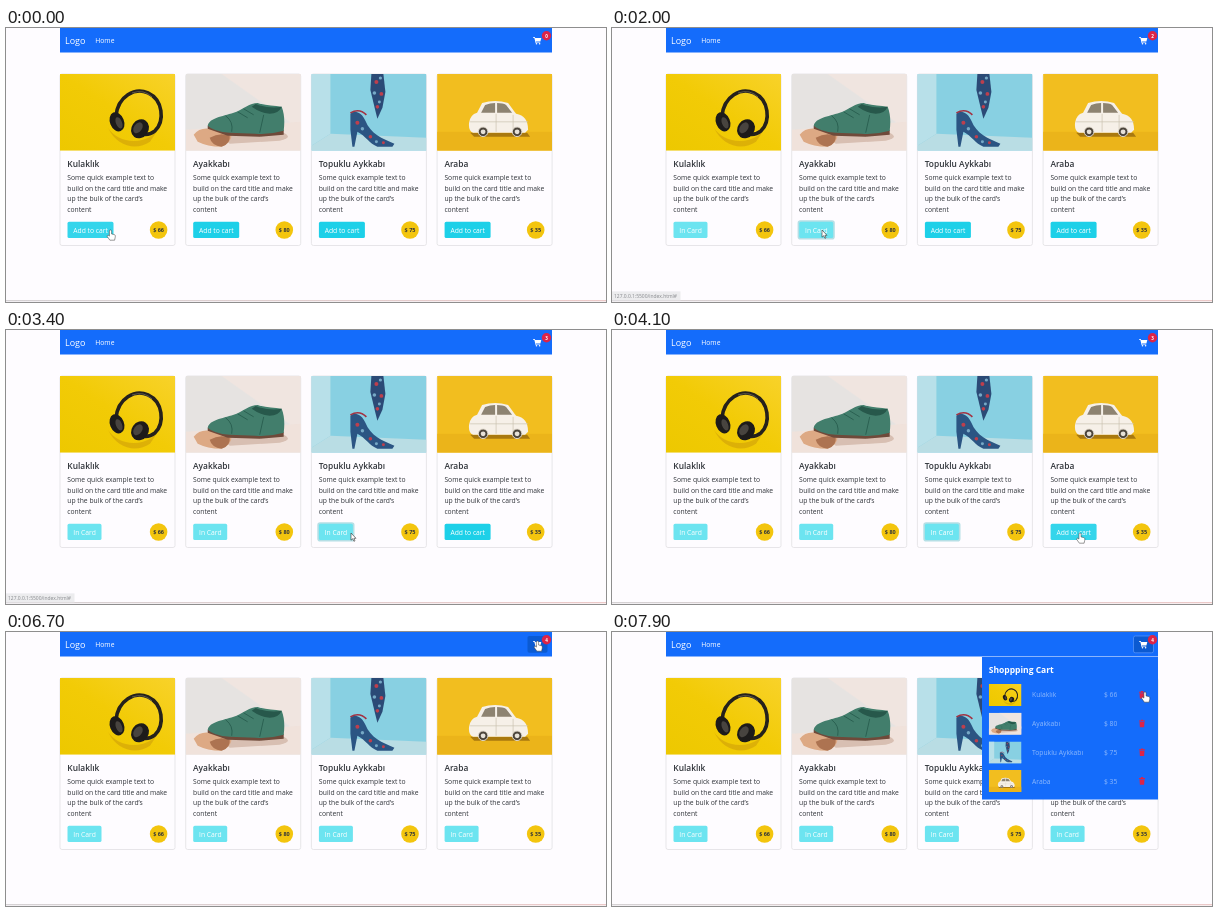
Write an HTML page that moves like this. It is 600 px wide and 274 px high and loops after 8000 ms.

```html
<!DOCTYPE html>
<html lang="en">
<head>
<meta charset="utf-8">
<style>
html, body { margin: 0; width: 600px; height: 274px; overflow: hidden; background: #fefcff; }
svg { display: block; }
text { font: 6.75px "Open Sans", sans-serif; fill: #30343a; white-space: pre; }
.light { fill: #fff; }
.brand { font-size: 9px; fill: #fff; }
.title { font-size: 8.4px; font-weight: 600; }
.heading { font-size: 8.5px; font-weight: 700; fill: #fff; }
.price { font-size: 5.5px; font-weight: 700; text-anchor: middle; }
.count { font-size: 4.6px; font-weight: 700; fill: #fff; text-anchor: middle; }
.item { fill: #8db8fc; }
.status { font-size: 4.95px; fill: #85878b; }
</style>
</head>
<body>
<svg width="600" height="274" viewBox="0 0 600 274">
  <defs>
    <linearGradient id="yellow" x1="0" y1="1" x2="1" y2="0">
      <stop stop-color="#edc800"/><stop offset=".5" stop-color="#f2cb06"/><stop offset="1" stop-color="#f8d22a"/>
    </linearGradient>
    <linearGradient id="edge"><stop stop-color="#d5d2d4"/><stop offset="1" stop-color="#ecc9c8"/></linearGradient>
    <symbol id="photo0" viewBox="0 0 115 77" preserveAspectRatio="none">
      <path fill="url(#yellow)" d="M0 0H115V77H0Z"/>
      <path fill="#c9980a" opacity=".5" d="M48 54C56 67 76 72 92 62L102 50 90 68C76 78 56 72 48 54Z"/>
      <path fill="none" stroke="#25211c" stroke-width="3.6" d="M56 42C58 22 75 13 88 19C103 26 105 47 95 57Q89 62 81 60"/>
      <path fill="none" stroke="#77715f" stroke-width=".7" d="M72 19Q84 15 92 23"/>
      <g fill="#1d1b1a">
        <ellipse cx="57" cy="48" rx="7" ry="10" transform="rotate(-22 57 48)"/>
        <ellipse cx="80" cy="55" rx="8.5" ry="10" transform="rotate(35 80 55)"/>
      </g>
      <g fill="#48443f">
        <ellipse cx="59" cy="49" rx="3" ry="6" transform="rotate(-22 59 49)"/>
        <ellipse cx="78" cy="54" rx="4" ry="6" transform="rotate(35 78 54)"/>
      </g>
    </symbol>
    <symbol id="photo1" viewBox="0 0 115 77" preserveAspectRatio="none">
      <path fill="#e6e3e1" d="M0 0H115V77H0Z"/>
      <path fill="#f0e5e0" d="M36 0H115V56Z"/>
      <path fill="#f0e2db" d="M0 56L115 48V77H0Z"/>
      <path fill="#d8bfb2" d="M36 62L98 59Q108 64 94 67L44 70Z"/>
      <path fill="#dda984" d="M8 61Q14 53 25 55L46 60Q46 70 35 73Q22 73 12 68Z"/>
      <path fill="#ad7351" d="M24 64Q34 58 44 62Q45 70 36 73Q26 72 24 64Z"/>
      <path fill="#6f4a3a" d="M22 52L44 58 74 59 98 56V61L74 63 42 62 22 55Z"/>
      <path fill="#427e6c" d="M22 52C24 44 36 43 48 39C58 35 64 29 72 29C80 32 88 31 96 33C99 41 99 49 98 57Q84 61 70 60L44 59Q28 58 22 52Z"/>
      <path fill="#27584b" d="M70 30Q82 35 96 33Q93 40 84 40Q74 39 66 33Z"/>
      <path fill="none" stroke="#2b6152" d="M52 38L62 44M58 35L68 41M40 42Q48 48 46 58M78 41L74 59"/>
    </symbol>
    <symbol id="photo2" viewBox="0 0 115 77" preserveAspectRatio="none">
      <path fill="#88d0e2" d="M0 0H115V77H0Z"/>
      <path fill="#b8e0e9" d="M0 0H19V60L0 72Z"/>
      <path fill="#b9dde4" d="M19 60L115 64V77H0V72Z"/>
      <path fill="#2b4a76" d="M60 0H72L74 18 71 34 66 45 63 33 59 16Z"/>
      <path fill="#2b5583" d="M39 40C43 35 51 39 54 47C59 60 71 65 83 70L81 73H66C58 70 54 62 46 58L43 73H41L39 56Z"/>
      <path fill="none" stroke="#a33343" stroke-width="1.6" d="M39 39Q48 34 55 41"/>
      <g fill="#bd3f4d"><circle cx="65" cy="8" r="2"/><circle cx="70" cy="20" r="1.9"/><circle cx="66" cy="33" r="1.8"/><circle cx="46" cy="49" r="2"/><circle cx="59" cy="63" r="1.8"/><circle cx="72" cy="69" r="1.5"/></g>
      <g fill="#76a9c6"><circle cx="69" cy="4" r="1.6"/><circle cx="63" cy="19" r="1.8"/><circle cx="68" cy="28" r="1.5"/><circle cx="51" cy="55" r="1.7"/><circle cx="65" cy="68" r="1.5"/></g>
    </symbol>
    <symbol id="photo3" viewBox="0 0 115 77" preserveAspectRatio="none">
      <path fill="#f2be1f" d="M0 0H115V77H0Z"/>
      <path fill="#ebb41a" d="M0 58H115V77H0Z"/>
      <path fill="#a9790f" d="M33 59H90L93 63H37Z"/>
      <path fill="#f6f0e8" d="M32 49Q33 41 40 39L45 29Q58 25 71 29L79 40Q91 42 91 56L88 59H36Q31 57 32 49Z"/>
      <path fill="#8d8371" d="M44 39L48 31Q53 29 58 29V39ZM60 39V29Q66 29 69 31L75 39Z"/>
      <path fill="none" stroke="#c9c0af" stroke-width=".7" d="M33 48H91M59 40V58M76 41V55"/>
      <g fill="#4b443b" stroke="#e2dbcf"><circle cx="46" cy="58" r="4.8"/><circle cx="80" cy="58" r="4.8"/></g>
      <g fill="#e6e1d8"><circle cx="46" cy="58" r="2.4"/><circle cx="80" cy="58" r="2.4"/></g>
    </symbol>
    <path id="trash" fill="#dc2448" d="M-3-3.2H-1.2L-.8-4H.8L1.2-3.2H3V-2.2H-3ZM-2.5-1.7H2.5L2.1 3.6H-2.1Z"/>
    <path id="arrow" fill="#fff" stroke="#333" stroke-width=".6" d="M0 0V7.2L1.7 5.7 2.9 8.3 4 7.8 2.9 5.3H5Z"/>
    <path id="hand" fill="#fff" stroke="#333" stroke-width=".5" d="M-1.1 1C-1.1-.4 1.1-.4 1.1 1V4L3.6 4.5C4.8 4.8 5 5.8 4.7 7.4L4.1 10.2H-.6L-3.2 6.6C-3.7 5.5-2.6 4.8-1.8 5.5L-1.1 6.1Z"/>
  </defs>
  <g id="page"></g>
  <g id="live"></g>
</svg>
<script>
const BLUE = '#146cfb', LOOP = 8000;
const products = [['Kulaklık', 66], ['Ayakkabı', 80], ['Topuklu Aykkabı', 75], ['Araba', 35]];
const blurb = ['Some quick example text to', 'build on the card title and make', 'up the bulk of the card’s', 'content'];
const clicks = [400, 2000, 3200, 4600];
const statusTimes = [[300, 1300], [1800, 2500], [3000, 3600], [4200, 5500]];
const cartHover = 6300, cartClick = 6700, panelOpen = 6800;
// time, x, y of the pointer tip
const path = [
  [0, 104.5, 202], [500, 104.5, 202], [1000, 141, 202], [1750, 210, 202], [2200, 210, 202],
  [2800, 362, 206], [3050, 345, 203], [3400, 345, 203], [4100, 468, 203], [4750, 468, 203],
  [5100, 487.5, 174.5], [5450, 493, 160], [6300, 531.5, 9], [7100, 531.5, 9], [7800, 533, 60], [LOOP, 533, 60]
];

const cardX = i => 54 + i * 125.7;
const rect = (x, y, w, h, fill, more = '') =>
  `<rect x="${x}" y="${y}" width="${w}" height="${h}" fill="${fill}" ${more}/>`;
const label = (x, y, cls, str) => `<text x="${x}" y="${y}" class="${cls}">${str}</text>`;
const circle = (x, y, r, fill) => `<circle cx="${x}" cy="${y}" r="${r}" fill="${fill}"/>`;
const photo = (i, x, y, w, h) => `<use href="#photo${i}" x="${x}" y="${y}" width="${w}" height="${h}"/>`;
const place = (id, x, y) => `<use href="#${id}" x="${x}" y="${y}"/>`;

function card([name, price], i) {
  const x = cardX(i);
  return rect(x, 46, 115, 171.5, '#fefcff', 'rx="2" stroke="#dedde0" stroke-width=".7"') +
    photo(i, x, 46, 115, 76.7) +
    label(x + 7.3, 138.7, 'title', name) +
    blurb.map((line, n) => label(x + 7.3, 152.3 + n * 10.5, '', line)).join('') +
    circle(x + 98.6, 202, 8.8, '#f3c50e') + label(x + 98.6, 204, 'price', '$ ' + price);
}

function button(i, t, pointer) {
  const x = cardX(i) + 7.5, added = t >= clicks[i], width = added ? 34 : 46;
  const end = i < 3 ? clicks[i + 1] : cartClick;
  const ring = added && t < end ? rect(x - 1.6, 192.2, width + 3.2, 19.4, '#b5dfe5', 'rx="2.8"') : '';
  const fill = added ? '#6ce4f0' : overButton(i, pointer) ? '#34d5eb' : '#1dd0e8';
  return ring + rect(x, 193.8, width, 16.2, fill, 'rx="1.6"') +
    label(x + 5.8, 204.6, 'light', added ? 'In Card' : 'Add to cart');
}

function overButton(i, [x, y]) {
  const left = cardX(i) + 7.5;
  return x > left && x < left + 46 && y > 193 && y < 210;
}

function cart(t, count) {
  const shade = Math.min(1, Math.max(0, (t - cartHover) / 150));
  const border = t >= panelOpen ? 'stroke="#5291f8" stroke-width=".8"' : '';
  return rect(521.5, 4, 20, 16.8, '#0b5ad2', `rx="1.8" opacity="${shade}" ${border}`) +
    `<path fill="#fff" d="M527 9H528.8L529.2 10H535.3L534.4 13.6H530L530.2 14.4H534.2V15H529.6L528.3 9.8H527Z"/>` +
    circle(530.5, 15.8, .8, '#fff') + circle(533.6, 15.8, .8, '#fff') +
    circle(540.5, 7.8, 4.7, '#dc2448') + label(540.5, 9.5, 'count', count);
}

function panel() {
  return rect(370, 25, 176, 142.5, BLUE) + label(376.8, 41.2, 'heading', 'Shoppping Cart') +
    products.map(([name, price], i) => {
      const y = 63 + i * 28.7;
      return photo(i, 376.8, y - 11, 32.7, 22) + label(420, y + 2.4, 'item', name) +
        label(492, y + 2.4, 'item', '$ ' + price) + place('trash', 530, y);
    }).join('');
}

function pointerAt(t) {
  const n = path.findIndex(p => p[0] > t), [t0, x0, y0] = path[n - 1], [t1, x1, y1] = path[n];
  const u = (t - t0) / (t1 - t0), e = u * u * (3 - 2 * u);
  return [x0 + (x1 - x0) * e, y0 + (y1 - y0) * e];
}

function draw() {
  const t = performance.now() % LOOP, p = pointerAt(t);
  const count = clicks.filter(c => t >= c).length;
  const overCart = p[0] > 521 && p[1] < 21;
  const overTrash = t > panelOpen && p[1] > 57;
  const hand = overCart || overTrash || clicks.some((c, i) => t < c && overButton(i, p));
  live.innerHTML = products.map((_, i) => button(i, t, p)).join('') + cart(t, count) +
    (t >= panelOpen ? panel() : '') +
    (statusTimes.some(([a, b]) => t >= a && t < b)
      ? rect(0, 263.4, 68.5, 9, '#ececee') + label(2, 270, 'status', '127.0.0.1:5500/index.html#') : '') +
    place(hand ? 'hand' : 'arrow', ...p);
  requestAnimationFrame(draw);
}

const live = document.getElementById('live');
document.getElementById('page').innerHTML = rect(54, 0, 492, 24.5, BLUE) +
  label(59, 16.2, 'brand', 'Logo') + label(89.3, 15.3, 'light', 'Home') +
  products.map(card).join('') + rect(0, 272, 600, 1.3, 'url(#edge)');
draw();
</script>
</body>
</html>
```
